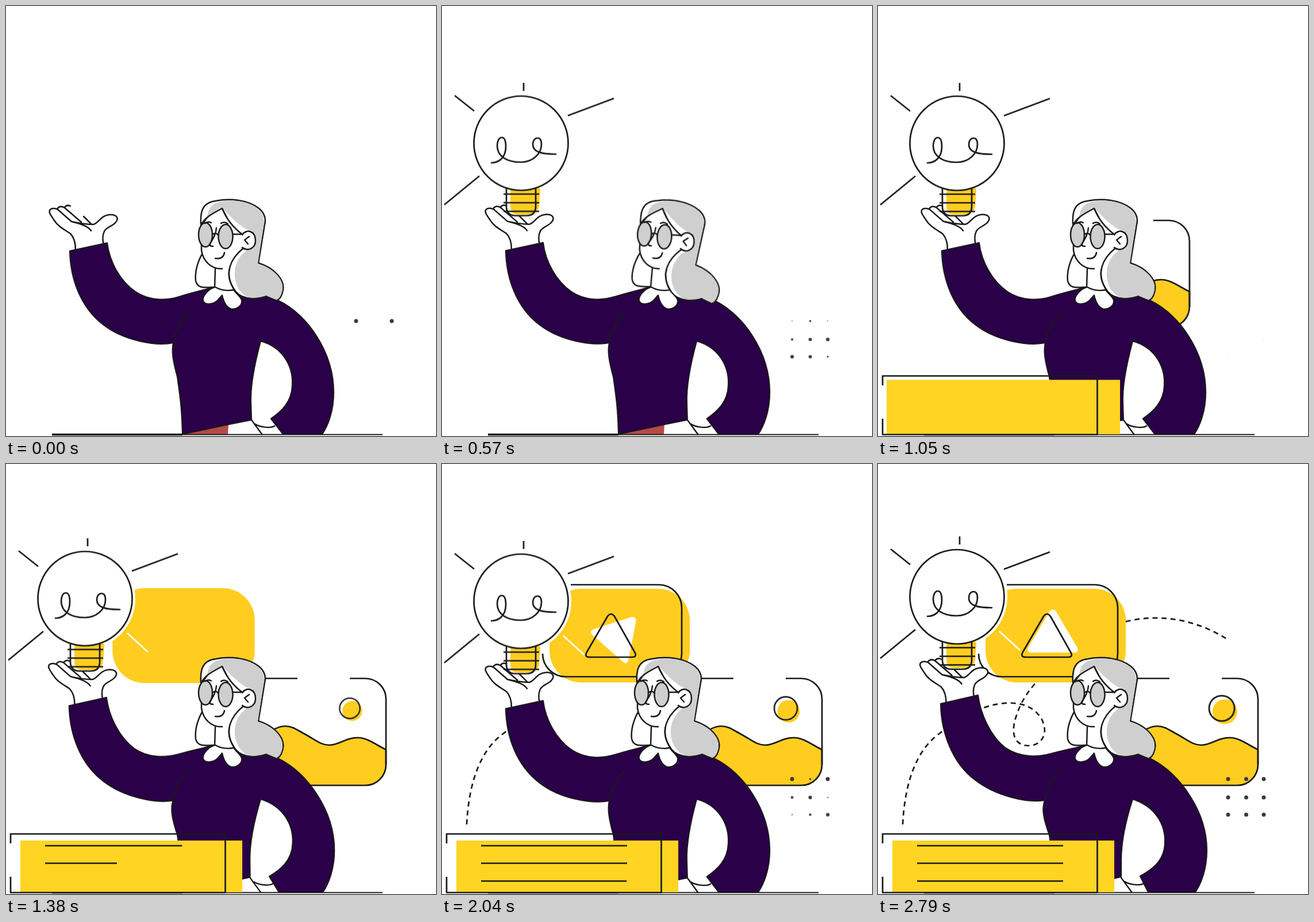
Write an HTML page that moves like this. It is 748 px wide and 748 px high and loops after 2.82 s.

```html
<!DOCTYPE html>
<html lang="en">
<head>
<meta charset="utf-8">
<title>Bright idea</title>
<style>
@property --lift { syntax: "<number>"; inherits: true; initial-value: 0; }
html, body { margin: 0; width: 100%; height: 100%; overflow: hidden; background: #fff; }
svg {
  display: block; width: 100vw; height: 100vh;
  --ink: #1a1a1a; --gold: #ffcd20; --sine: cubic-bezier(.37, 0, .63, 1);
  fill: none; stroke: var(--ink); stroke-width: 2.7; stroke-linejoin: round;
}
svg, svg * { animation: 2820ms linear infinite; }
svg { animation-name: lift; animation-timing-function: var(--sine); }
.white { fill: #fff; }
.gray { fill: #cfcfcf; }
.gold { fill: var(--gold); }
.flat { stroke: none; }
.round { stroke-linecap: round; }
.draw { stroke-dasharray: 1; }

/* sway shared by arm, hand, bulb and sun */
@keyframes lift {
  0%, 19.1%, 36.5%, 53.9%, 71.3%, 88.7% { --lift: 0; }
  27.8%, 45.2%, 62.6%, 80%, 97.3%, 100% { --lift: 1; }
}
#torso { animation-name: torso; animation-timing-function: var(--sine); fill: #2a0048; stroke-width: 2.2; }
@keyframes torso {
  0%, 19.1%, 36.5%, 53.9%, 71.3%, 88.7% {
    d: path("M111 426L176 412C180 445 198 478 225 497C250 514 280 512 300 506C325 498 345 494 357 490L395 494L453 505L475 513C524 537 570 602 570 672C570 705 560 730 550 745L482 745L461 718C478 706 497 690 498 660C500 625 480 593 443 583C433 620 425 660 426 690L427 720L387 728L307 745C306 700 303 680 298 645C290 615 288 600 291 586C260 592 205 582 170 555C130 525 112 475 111 426Z");
  }
  27.8%, 45.2%, 62.6%, 80%, 97.3%, 100% {
    d: path("M109 417L174 402C178 435 196 474 222 494C247 511 277 510 300 504C325 497 345 494 357 490L395 494L453 505L475 513C525 539 572 604 572 672C572 705 562 730 552 745L470 745L456 717C474 707 498 692 499 660C501 625 480 595 443 583C431 620 423 660 423 690L423 718L387 727L307 745C306 700 303 680 298 645C287 615 285 600 290 585C260 590 205 578 168 549C128 518 110 466 109 417Z");
  }
}
#hand { transform: translate(calc(var(--lift) * -2.5px), calc(var(--lift) * -8.5px)); }
#hip { transform: translate(calc(var(--lift) * -4.5px), calc(var(--lift) * -1px)); }
#bulb { transform: translateY(calc(var(--lift) * -8px)); }
#glow { transform-origin: 129px 381px; animation-name: glow; animation-timing-function: ease-in-out; }
@keyframes glow {
  0%, 1% { transform: scale(0); }
  10.6% { transform: scale(1.17); }
  17%, 100% { transform: scale(1); }
}
#head { transform-origin: 376px 490px; animation-name: nod; animation-timing-function: ease-in-out; }
@keyframes nod {
  0%, 14.9%, 36.5%, 100% { transform: rotate(0); }
  25.5%, 28.5% { transform: rotate(6.3deg); }
}

#desk { fill: #ffd423; transform-origin: 218px 745px; animation-name: desk; animation-timing-function: ease-in-out; }
@keyframes desk {
  0%, 28.7% { transform: scale(0); }
  36.2% { transform: scale(1.06); }
  40.4%, 100% { transform: scale(1); }
}
#frame { animation-name: frame; }
@keyframes frame { 0%, 28.4% { stroke-dashoffset: 1; } 36.9%, 100% { stroke-dashoffset: 0; } }
#row1, #row2, #row3 { animation-timing-function: ease-out; }
#row1 { animation-name: row1; }
#row2 { animation-name: row2; }
#row3 { animation-name: row3; }
@keyframes row1 { 0%, 37.6% { stroke-dashoffset: 1; } 51.8%, 100% { stroke-dashoffset: 0; } }
@keyframes row2 { 0%, 44.3% { stroke-dashoffset: 1; } 58.2%, 100% { stroke-dashoffset: 0; } }
@keyframes row3 { 0%, 58.7% { stroke-dashoffset: 1; } 73%, 100% { stroke-dashoffset: 0; } }

#picture { animation-name: slide; animation-timing-function: ease-in-out; }
@keyframes slide { 0%, 31.9% { transform: translateX(-240px); } 42.6%, 100% { transform: none; } }
#sun { transform-origin: 598px 425px; animation-name: sun; animation-timing-function: ease-out; }
@keyframes sun { 0%, 43.6% { transform: scale(0); } 51.8%, 100% { transform: scale(1); } }
#pulse { transform-origin: 598px 425px; transform: scale(calc(.95 + .1 * var(--lift))); }

#screen { transform-origin: 309px 298px; animation-name: screen; animation-timing-function: ease-in-out; }
@keyframes screen {
  0%, 43% { transform: scale(0); }
  50% { transform: scale(1.06); }
  54%, 100% { transform: scale(1); }
}
#play { transform-origin: 304px 303px; animation-name: play; }
@keyframes play {
  0%, 51.8% { transform: rotate(360deg) scale(0); }
  58.5% { transform: rotate(180deg) scale(.46); animation-timing-function: cubic-bezier(.2, .5, .6, 1); }
  72.3% { transform: rotate(42deg) scale(.95); animation-timing-function: ease-out; }
  86%, 100% { transform: rotate(0) scale(1); }
}
.edge { animation-name: edge; animation-timing-function: ease-in-out; }
@keyframes edge { 0%, 55.4% { stroke-dashoffset: 1; } 69.6%, 100% { stroke-dashoffset: 0; } }
#reveal { stroke: #fff; stroke-width: 10; stroke-dasharray: 970; animation-name: trail; }
@keyframes trail { 0%, 63.1% { stroke-dashoffset: 970; } 97.9%, 100% { stroke-dashoffset: 0; } }

#dots circle { fill: #3a3a3a; stroke: none; transform-box: fill-box; transform-origin: center; }
</style>
</head>
<body>
<svg viewBox="0 0 748 748">
  <defs>
    <path id="route" pathLength="970" d="M43 627C46 565 62 500 108 468C135 446 155 432 181 425C205 416 258 404 283 441C299 467 285 490 262 490C238 490 230 470 240 440C248 415 258 400 273 382C320 320 380 285 436 273C495 260 555 272 606 304"/>
    <mask id="shown" maskUnits="userSpaceOnUse" x="0" y="0" width="748" height="748">
      <use id="reveal" href="#route"/>
    </mask>
    <clipPath id="behind"><rect x="425" y="350" width="323" height="230"/></clipPath>
  </defs>

  <g mask="url(#shown)"><use href="#route" stroke-dasharray="9 7"/></g>

  <!-- video card -->
  <rect id="screen" class="gold flat" x="187" y="217" width="244" height="163" rx="55"/>
  <path id="play" class="white flat" d="M298 257L262 318Q257 328 267 328H341Q351 328 346 318L310 257Q304 249 298 257Z"/>
  <path class="draw edge" pathLength="1" d="M224 210H377A40 40 0 0 1 417 250V330A40 40 0 0 1 377 370H215A40 40 0 0 1 175 330"/>
  <path class="draw edge" pathLength="1" d="M288 265L252 327Q247 336 257 336H331Q340 336 335 327L300 265Q294 257 288 265"/>

  <!-- picture card -->
  <g clip-path="url(#behind)">
    <g id="picture">
      <path class="gold" d="M400 559V510C430 500 455 456 486 456C500 456 508 464 522 471C538 480 548 489 562 489C580 489 590 476 612 476C628 476 643 488 661 497V523A36 36 0 0 1 625 559Z"/>
      <path d="M400 373H507M598 373H625A36 36 0 0 1 661 409V523"/>
      <g id="sun"><g id="pulse">
        <circle class="gold flat" cx="603" cy="430.500" r="20.500"/>
        <circle cx="598" cy="425" r="21"/>
      </g></g>
    </g>
  </g>
  <g id="dots"></g>

  <!-- bulb -->
  <g id="bulb"><g id="glow">
    <circle class="white flat" cx="137" cy="239" r="88"/>
    <path class="gold flat" d="M119 317H168Q171 317 171 321L169 348Q167 363 150 363H132Q119 363 119 348Z"/>
    <path d="M112 317V349Q112 365 128 365H147Q163 365 163 349V317M107 327.500H169M107 342.500H169M107 357.500H169"/>
    <circle class="white" cx="137.500" cy="239" r="82"/>
    <path class="round" d="M86 273C97 273 111 266 111 245C111 234 108 229 104 229C99 229 96 236 96 243C96 262 113 272 137 272C158 272 173 257 173 241C173 233 170 230 166 230C161 230 158 235 158 241C158 254 172 258 198 258"/>
    <path d="M142 134V148M22 156L56 183M299 161L219 191M65 296L4 346"/>
    <path stroke="#fff" d="M211 299L247 332"/>
  </g></g>

  <!-- figure -->
  <g id="hand" class="round" stroke-width="2.500">
    <path class="white flat" d="M121 428C121 410 118 402 112 396C100 388 90 383 84 373C78 364 73 358 77 354C81 351 86 352 90 354L118 375L150 380C158 380 165 364 180 363C192 362 197 369 191 376C186 383 175 384 171 392C167 400 168 408 170 418Z"/>
    <path d="M121 424C121 410 118 402 112 396C100 388 90 383 84 373C78 364 73 358 77 354C81 351 86 352 90 354L114 375C130 379 143 383 148 391M89 353Q94 346 102 351L131 376M102 350Q106 345 112 348M135 366L149 380M114 375C128 378 142 380 152 380C161 378 165 364 180 363C192 362 197 369 191 376C186 383 175 384 171 392C167 400 168 408 170 416"/>
  </g>
  <path class="flat" fill="#b54a48" d="M309 745L387 727L386 745Z"/>
  <path id="torso"/>
  <path stroke-width="2.200" d="M318 533C305 548 293 566 291 586"/>
  <path id="hip" d="M427 720L446 746M433 727C440 732 460 736 468 730" stroke-width="2.400"/>

  <g id="head" class="round" stroke-width="2.500">
    <path class="white" d="M345 425C335 440 328 460 330 478C333 492 345 490 362 489"/>
    <path class="white flat" d="M363 440H400V494Q380 499 363 492Z"/>
    <path class="white" d="M339 380C338 360 340 342 365 339C390 334 420 337 440 352C452 362 452 372 450 380L439 447C465 455 485 475 482 493C480 505 475 511 470 512L453 505C430 513 405 510 395 490C380 465 390 440 412 422L376 352Z"/>
    <path class="gray flat" d="M350 368C352 350 358 341 385 338.500C420 337 450 350 449 377L438 448C465 456 483 475 481 493C479 504 475 510 470 511L453 504Q440 509 425 508C400 500 392 468 402 445Q408 432 420 424L428 392C412 388 396 372 378 353Z"/>
    <path class="white flat" d="M376 352C360 360 345 372 341 385V425C343 445 358 458 376 457L396 458L412 422L411 396C396 384 384 370 376 352Z"/>
    <path d="M340 380C347 366 362 360 376 352C384 372 397 387 412 398M340 378V425C343 445 358 458 376 457M364 457L363 490M363 491C372 497 390 496 397 493"/>
    <path d="M412 422C390 440 380 465 395 490C405 510 430 513 453 505"/>
    <path class="white" d="M411 398C418 387 434 391 434 408C434 421 421 428 411 420"/>
    <path d="M423 401L415 407L421 414"/>
    <ellipse class="gray" cx="347" cy="398" rx="12" ry="21"/>
    <ellipse class="gray" cx="382" cy="401" rx="12.500" ry="21"/>
    <path d="M359 398Q364 393 369 398M394 397H411M366 386C365 398 360 405 355 413Q353 418 360 418M346 378Q351 374 357 377M374 378Q380 374 386 379M364 439Q378 441 380 429"/>
  </g>
  <path class="white" stroke-width="2.200" d="M364 489C352 492 341 505 343 513C347 522 362 518 368 512L376 503C378 512 382 524 392 527C403 528 411 520 410 512C409 506 400 500 396 494Q378 497 364 489Z"/>

  <!-- desk -->
  <path stroke-width="3.500" d="M80 745.500H307"/>
  <path stroke-width="2" d="M307 745.500H655"/>
  <rect id="desk" class="flat" x="25" y="655" width="386" height="90"/>
  <path id="frame" class="draw" pathLength="1" d="M8 660V643.500H381.500V745.500H8V718"/>
  <path id="row1" class="draw" pathLength="1" d="M68 664H322"/>
  <path id="row2" class="draw" pathLength="1" d="M68 694.500H322"/>
  <path id="row3" class="draw" pathLength="1" d="M68 725.500H322"/>
</svg>
<script>
const LOOP = 2820;
// per dot, row by row: stagger of shrinking, stagger of the second growth
const stagger = [
  [0, 0], [1.8, 3.4], [0, 0],
  [2, 2.8], [3.6, 2], [4, 4],
  [4, 4], [3.6, 3], [1.3, 2]
];
const dots = document.getElementById("dots");
stagger.forEach(([out, back], i) => {
  const dot = document.createElementNS("http://www.w3.org/2000/svg", "circle");
  dot.setAttribute("cx", [609, 640.5, 671][i % 3]);
  dot.setAttribute("cy", [548, 580, 610][Math.floor(i / 3)]);
  dot.setAttribute("r", 3.5);
  dots.append(dot);

  const key = (ms, size) => ({ offset: ms / LOOP, transform: `scale(${size})` });
  const born = 20 + 25 * out, fade = 80 + 105 * out, grow = 1600 + 87 * back;
  const start = out ? [key(0, 0), key(born, 0), key(born + 150, 1)] : [key(0, 1)];
  dot.animate([
    ...start, key(fade, 1), key(fade + 630, 0),
    key(grow, 0), key(grow + 300, 1), key(LOOP, 1)
  ], { duration: LOOP, iterations: Infinity });
});
</script>
</body>
</html>
```
